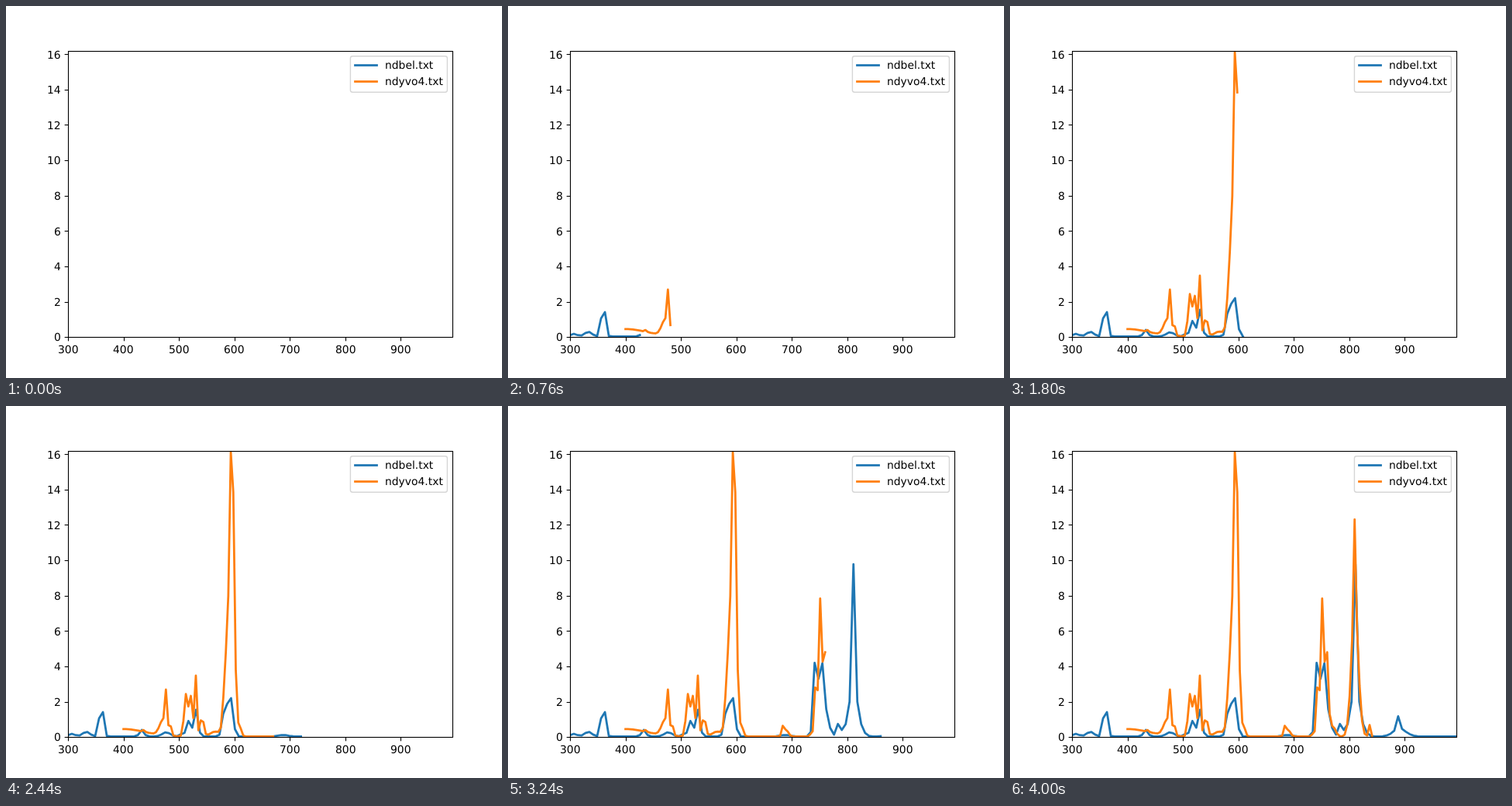
Write an HTML page with a canvas that moves like this. It is 640 px wide and 480 px high and loops after 5600 ms.

```html
<!DOCTYPE html>
<html lang="en">
<head>
<meta charset="utf-8">
<title>Spectra</title>
<style>
  html, body { margin: 0; width: 100%; height: 100%; overflow: hidden; background: #fff; }
  canvas { display: block; width: 640px; height: 480px; }
</style>
</head>
<body>
<canvas id="plot" width="640" height="480"></canvas>
<script>
const ctx = document.getElementById('plot').getContext('2d');
const LOOP = 5600, STEP = 40, BASELINE = 0.035;
const box = { left: 80, top: 57.6, right: 576, bottom: 427.2 };
const px = v => box.left + (v - 300) * (box.right - box.left) / 693;
const py = v => box.bottom - v * 22.81;
const snap = v => Math.floor(v + 0.5) + 0.5;

// Each band is [centre, height, width]; without a width it is as sharp as the sampling.
const series = [
  {
    name: 'ndbel.txt', color: '#1f77b4', x0: 300, dx: 7, count: 100,
    bands: [
      [307, .15, 8], [333, .27, 9], [360, 2, 4.9], [433, .37, 5.6],
      [477, .24, 10], [507, .22, 5], [517, .85], [524, .36], [531.7, 1.53, 4.5],
      [583.2, 1.7, 6], [593.3, 2.13, 6], [688, .08, 13],
      [741, 4], [748, 2.6], [756, 4.1, 5.3], [766, .6, 6.3], [784, .7, 5],
      [811, 7.84], [811, 1.9, 14], [888, .75], [891, .4, 17]
    ]
  },
  {
    name: 'ndyvo4.txt', color: '#ff7f0e', x0: 400, dx: 4.5, count: 99,
    bands: [
      [400, .42, 54], [436.5, .1], [471, .85, 8.6], [476.5, 2.03], [484, .6, 3.2],
      [512.5, 2.35, 4.5], [521.5, 2.25, 4.5], [530.5, 3.4], [541.5, 1.1, 4.5],
      [566, .28, 13], [585, 4.2, 6], [595.3, 17.1, 5.8], [609, .6, 4.5],
      [683.5, .43], [689, .4, 6], [737, .2, 5.4], [744, 3.8, 3.4],
      [751.5, 7.7, 2.9], [758.7, 5.1, 4.5], [770, .58, 7],
      [809.5, 5.3], [810, 7, 9], [836.5, .65]
    ]
  }
];

for (const s of series) {
  const level = x => s.bands.reduce(
    (sum, [centre, height, width = s.dx * 0.6]) =>
      sum + height * Math.exp(-(((x - centre) / width) ** 2)),
    BASELINE);
  s.points = Array.from({ length: s.count }, (_, i) => {
    const x = s.x0 + i * s.dx;
    return [px(x), py(level(x))];
  });
}

function stroke(points, color, width, cap = 'butt') {
  ctx.beginPath();
  points.forEach(([x, y]) => ctx.lineTo(x, y));
  ctx.strokeStyle = color;
  ctx.lineWidth = width;
  ctx.lineCap = cap;
  ctx.lineJoin = 'round';
  ctx.stroke();
}

// Text starts on a whole pixel; anchor is the share of its width left of x.
function text(str, x, y, anchor = 0) {
  ctx.fillStyle = '#000';
  ctx.fillText(str, Math.round(x - ctx.measureText(str).width * anchor), Math.round(y));
}

function drawCurves(count) {
  if (count < 2) return;
  ctx.save();
  ctx.beginPath();
  ctx.rect(box.left, box.top, box.right - box.left, box.bottom - box.top);
  ctx.clip();
  for (const { points, color } of series) {
    stroke(points.slice(0, count), color, 2.78, 'square');
  }
  ctx.restore();
}

function drawAxes() {
  const l = snap(box.left), t = snap(box.top), r = snap(box.right), b = snap(box.bottom);
  for (let v = 300; v <= 900; v += 100) {
    const x = snap(px(v));
    stroke([[x, b], [x, b + 4.86]], '#000', 1.11);
    text(v, px(v), 448, 0.5);
  }
  for (let v = 0; v <= 16; v += 2) {
    const y = snap(py(v));
    stroke([[l, y], [l - 4.86, y]], '#000', 1.11);
    text(v, 70.9, py(v) + 5.28, 1);
  }
  ctx.lineWidth = 1.11;
  ctx.lineJoin = 'miter';
  ctx.strokeRect(l, t, r - l, b - t);
}

function drawLegend() {
  ctx.beginPath();
  ctx.roundRect(444.4, 64.8, 125, 46.4, 2.78);
  ctx.fillStyle = 'rgba(255,255,255,.8)';
  ctx.fill();
  ctx.strokeStyle = 'rgba(204,204,204,.8)';
  ctx.lineWidth = 1.39;
  ctx.stroke();
  series.forEach(({ name, color }, i) => {
    const y = 76.5 + i * 21;
    stroke([[450.5, y], [478.5, y]], color, 2.78, 'square');
    text(name, 489, 81 + i * 21);
  });
}

function draw(now) {
  ctx.fillStyle = '#fff';
  ctx.fillRect(0, 0, 640, 480);
  ctx.font = '13.89px "DejaVu Sans", sans-serif';
  ctx.textRendering = 'geometricPrecision';
  drawCurves(Math.floor((now % LOOP) / STEP));
  drawAxes();
  drawLegend();
}

const start = performance.now();
function tick() {
  draw(performance.now() - start);
  requestAnimationFrame(tick);
}
tick();
</script>
</body>
</html>
```
